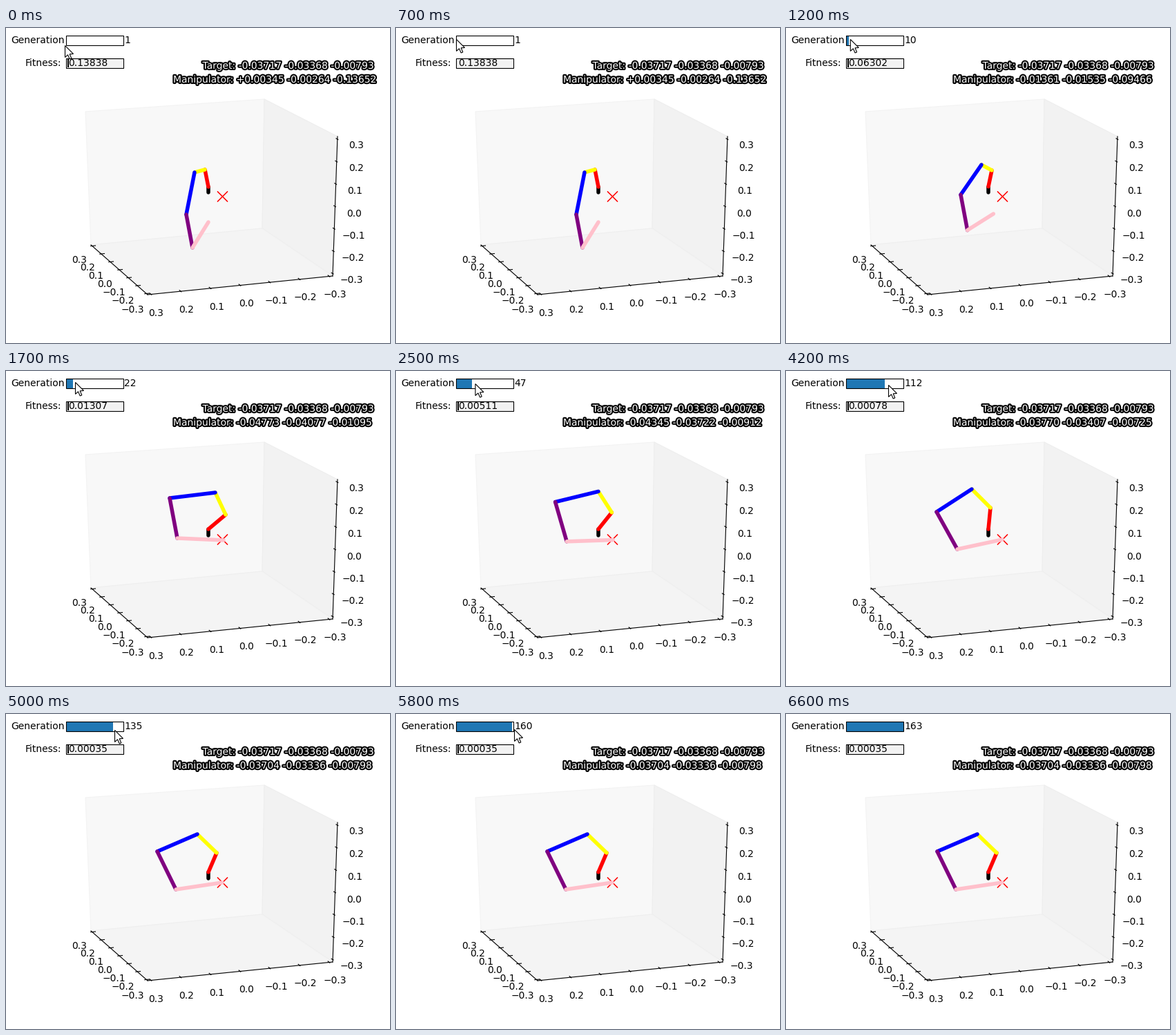
A matplotlib script that plays this animation: 556 by 456 pixels, repeating every 7.1 s.

```python
import numpy as np
import matplotlib.pyplot as plt
from matplotlib import patheffects
from matplotlib.animation import FuncAnimation
from matplotlib.patches import Polygon, Rectangle

W, H, DPI = 556, 456, 100
FRAMES, STEP = 71, 100
PX = 72 / DPI  # points per pixel

plt.rcParams["font.family"] = "DejaVu Sans"
# the small extra keeps the size from being rounded down a pixel
fig = plt.figure(figsize=((W + 0.01) / DPI, (H + 0.01) / DPI), dpi=DPI,
                 facecolor="white")
ax = fig.add_axes([0, 0, 1, 1])
ax.set_xlim(0, W)
ax.set_ylim(H, 0)
ax.axis("off")


def label(x, y, text, ha="left", **kw):
    """Text whose capitals are centred on y."""
    return ax.text(x, y + 5, text, ha=ha, va="baseline", fontsize=10, **kw)


def line(p, q, color="black", width=0.8, **kw):
    return ax.plot([p[0], q[0]], [p[1], q[1]], color=color, lw=width, **kw)[0]


def curve(first, mid, last, n=7):
    """n points on a parabola through three points."""
    u = np.linspace(0, 1, n)[:, None]
    a, b, c = map(np.array, (first, mid, last))
    return a * (1 - u) * (1 - 2 * u) + b * 4 * u * (1 - u) + c * u * (2 * u - 1)


# 3D box
A, B, C, D = (123, 314), (205, 386), (473, 359), (480, 157)
TOP_L, TOP_M, MID = (115, 121), (374, 103), (371, 290)
for corners, face, edge in (
    ((A, TOP_L, TOP_M, MID), "#f8f8f8", "#f3f3f3"),
    ((TOP_M, D, C, MID), "#f2f2f2", "#eeeeee"),
    ((A, MID, C, B), "#f4f4f4", "#efefef"),
):
    ax.add_patch(Polygon(corners, fc=face, ec=edge, lw=0.8, zorder=0))
for p, q in ((A, B), (B, C), (C, D)):
    line(p, q, zorder=1)

# ticks: end positions, inward step, then first, middle and last label
AXES = (
    ((125, 315.5), (203, 384.5), (4.5, -0.45),
     (106, 335), (143, 370), (183.5, 407)),
    ((210, 385.5), (468, 359.5), (-1.8, -1.5),
     (217.5, 412), (348, 398), (476, 385)),
    ((479.9, 161), (473.1, 355.5), (-1.9, -1.1),
     (507.5, 169), (504.5, 268), (500.5, 364)),
)
for start, end, inward, *spots in AXES:
    inward = np.array(inward)
    for k, (x, y) in enumerate(curve(*spots)):
        value = (3 - k) / 10
        label(x, y, f"{value:.1f}".replace("-", "\u2212"), ha="center")
        at = np.array(start) + (np.array(end) - start) * k / 6
        line(at + inward, at - inward / 2, zorder=1)

# target cross
for s in (-1, 1):
    line((306.5, 244 - 7 * s), (320.5, 244 + 7 * s), "red", 1.1, zorder=2)

# controls
LEFT, WIDTH = 86.5, 83
label(85, 17, "Generation", ha="right")
label(80.5, 50, "Fitness:", ha="right")
bar = ax.add_patch(Rectangle((LEFT, 11.5), 0, 14, fc="#1f77b4", lw=0, zorder=1))
ax.add_patch(Rectangle((LEFT, 11.5), WIDTH, 14, fc="none", ec="black", lw=0.8, zorder=2))
ax.add_patch(Rectangle((LEFT, 44.5), WIDTH, 14, fc="#f2f2f2", ec="black", lw=0.8, zorder=1))
gen_text = label(171, 17, "")
fit_text = label(90.3, 50, "")
caret = line((90, 45.5), (90, 57.5), width=1.4, zorder=4, solid_capstyle="butt")

# outlined readouts
outline = dict(color="white", path_effects=[
    patheffects.withStroke(linewidth=3, foreground="black")])
label(284.5, 54, "Target: -0.03717 -0.03368 -0.00793", **outline)
hand_text = label(242, 74, "", **outline)

# robot arm
COLORS = ("black", "red", "yellow", "blue", "purple", "pink")
links = [line((0, 0), (0, 0), c, 5.5 * PX, zorder=5 + i, solid_capstyle="round")
         for i, c in enumerate(COLORS)]
BASE = (293, 238)
POSES = np.array([
    [(293, 230), (288, 205), (273, 209), (261, 270), (270, 318), (293, 281)],
    [(293, 229), (318, 208), (303, 176), (237, 184), (248, 242), (315, 245)],
    [(293, 229), (304, 200), (278, 172), (221, 198), (246, 254), (313, 244)],
    [(293, 229), (296, 198), (269, 171), (218, 204), (248, 258), (313, 244)],
    [(293, 229), (305, 201), (277, 174), (219, 199), (246, 254), (313, 244)],
], float)
HANDS = np.array([
    (0.00345, -0.00264, -0.13652),
    (-0.04773, -0.04077, -0.01095),
    (-0.03703, -0.03189, -0.00637),
    (-0.03770, -0.03407, -0.00725),
    (-0.03704, -0.03336, -0.00798),
])
FITNESS = np.array([0.13838, 0.01307, 0.00125, 0.00078, 0.00035])
POSE_AT = (8, 17, 32, 42, 47)

# generation and pointer over time
GEN_AT = (8, 17, 32, 42, 50, 59)
GEN = (1, 22, 69, 112, 135, 163)
MOUSE_AT = (0, 5, 8, 17, 32, 42, 50, 58, 61, 64, 65, 66)
MOUSE_X = (85, 87, 87, 100, 127, 148, 157, 171, 190, 271, 370, 470)
MOUSE_Y = (25, 16, 16, 16, 20, 20, 23, 22, 45, 172, 437, 700)
ARROW = np.array([(0, 0), (0, 17), (4, 13.3), (6.7, 19.5), (9.3, 18.4),
                  (6.7, 12.3), (12, 12)]) + 0.5
mouse = ax.add_patch(Polygon(ARROW, fc="white", ec="black", lw=0.8, zorder=20))


def pose_blend(i):
    """Index of the current pose and the stepped share of the next one."""
    if i >= POSE_AT[-1]:
        return len(POSES) - 2, 1.0
    k = max(int(np.searchsorted(POSE_AT, i, side="right")) - 1, 0)
    a, b = POSE_AT[k:k + 2]
    return k, max(i - a, 0) // 3 * 3 / (b - a)


def update(i):
    gen = int(round(np.interp(i, GEN_AT, GEN)))
    bar.set_width(WIDTH * (gen - 1) / 162)
    gen_text.set_text(str(gen))

    k, u = pose_blend(i)
    joints = [BASE, *(POSES[k] * (1 - u) + POSES[k + 1] * u)]
    for link, p, q in zip(links, joints, joints[1:]):
        link.set_data([p[0], q[0]], [p[1], q[1]])
    hand = HANDS[k] * (1 - u) + HANDS[k + 1] * u
    hand_text.set_text("Manipulator: " + " ".join(f"{v:+.5f}" for v in hand))
    fit_text.set_text(f"{FITNESS[k] ** (1 - u) * FITNESS[k + 1] ** u:.5f}")
    caret.set_visible(not 5 <= i <= 8)

    mouse.set_xy(ARROW + (np.interp(i, MOUSE_AT, MOUSE_X),
                          np.interp(i, MOUSE_AT, MOUSE_Y)))
    return [bar, gen_text, fit_text, hand_text, caret, mouse, *links]


anim = FuncAnimation(fig, update, frames=FRAMES, interval=STEP,
                     repeat=True, repeat_delay=0, blit=False)
plt.show()
```
